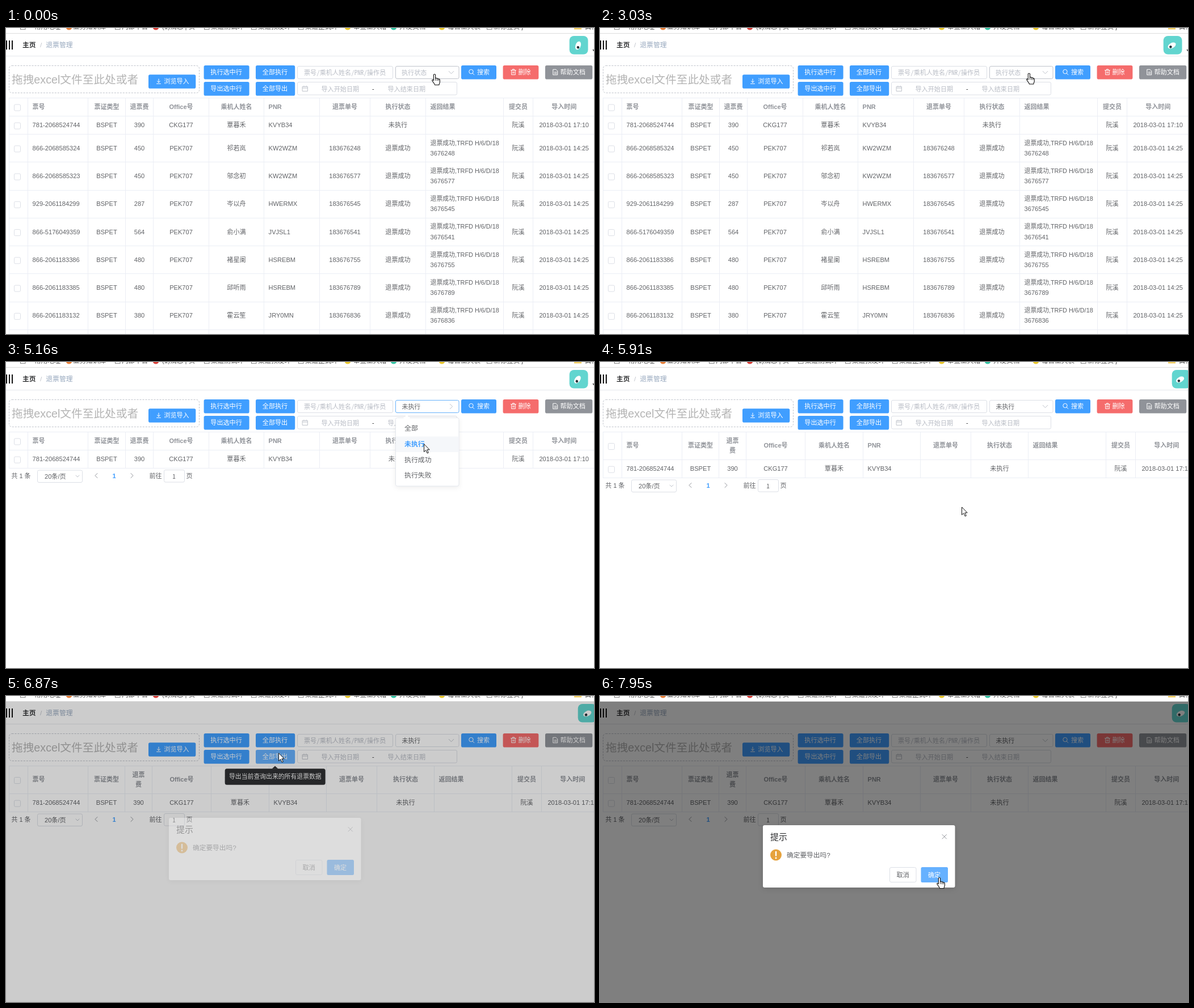
Write an HTML page that moves like this. It is 1036 px wide and 540 px high and loops after 8000 ms.

```html
<!DOCTYPE html>
<html lang="zh-CN">
<head>
<meta charset="utf-8">
<title>退票管理</title>
<style>
html, body { margin: 0; width: 100%; height: 100%; overflow: hidden; background: #fff; }
svg { display: block; font-family: "Liberation Sans", "Noto Sans CJK SC", "Noto Sans CJK JP", "Noto Sans CJK", sans-serif; }
text { white-space: pre; }
.thin { font-family: "Noto Sans Mono CJK SC", "Noto Sans CJK SC", "Noto Sans CJK", monospace; }
</style>
</head>
<body>
<svg id="stage" width="1036" height="540" viewBox="0 0 1036 540"></svg>
<script>
const LOOP = 8000;
const BLUE = '#409eff', LINE = '#ebeef5', EDGE = '#dcdfe6', BODY = '#606266', GREY = '#909399', PALE = '#c0c4cc';
const FOCUS = '#66b1fb';

// Drawing helpers; text is centred vertically on y
const text = (x, y, s, { size = 11.1, fill = BODY, mid = false, bold = false, cls = '' } = {}) =>
  `<text x="${x}" y="${(y + size * 0.36).toFixed(2)}" font-size="${size}" fill="${fill}" class="${cls}"` +
  `${mid ? ' text-anchor="middle"' : ''}${bold ? ' font-weight="700"' : ''}>${s}</text>`;
const rect = (x, y, w, h, fill, more = '') =>
  `<rect x="${x}" y="${y}" width="${w}" height="${h}" fill="${fill}" ${more}/>`;
const box = (x, y, w, h, more = '') => rect(x, y, w, h, '#fff', `rx="2.5" stroke="${EDGE}" ${more}`);
const line = (d, color, width = 1) =>
  `<path d="${d}" fill="none" stroke="${color}" stroke-width="${width}" stroke-linecap="round" stroke-linejoin="round"/>`;
const group = (id, inner) => `<g id="${id}">${inner}</g>`;
const button = (x, y, w, label, tx, fill = BLUE, id = '') =>
  rect(x, y, w, 24.5, fill, `rx="2.8" ${id && `id="${id}"`}`) + text(tx, y + 12.2, label, { fill: '#fff' });

// Browser strip: [kind, icon x, label x, label]
const marks = [
  ['page', 25, 50, '常用地址'], ['#e8803a', 111, 118, '业务知识库'], ['page', 192, 204, '内部平台'],
  ['#d9403a', 264, 275, '(1)消息 | 页'], ['page', 349, 361, '渠道测试环'], ['page', 432, 444, '渠道预发环'],
  ['page', 515, 527, '渠道正式环'], ['#e9c72b', 602, 612, '审查工具箱'], ['#35c5a5', 683, 693, '开发文档'],
  ['#e9c72b', 768, 778, '每日工具表'], ['page', 847, 859, '新标签页 j'], ['folder', 1001, 1020, '其他']
];
function strip() {
  const icon = (kind, x) =>
    kind === 'page' ? rect(x + 0.5, -8, 8.5, 10.5, '#fff', 'stroke="#888"') :
    kind === 'folder' ? rect(x, -6, 13, 8.5, '#f3cf63') :
    `<circle cx="${x}" cy="-2" r="5.5" fill="${kind}"/>`;
  return rect(0, 0, 1036, 10, '#fff') +
    marks.map(([k, x, tx, s]) => icon(k, x) + text(tx, -2.3, s, { size: 11.6, fill: '#555' })).join('') +
    rect(0, 9, 1036, 1, '#dcdcdc');
}

function header() {
  return [0, 5, 10].map(x => rect(x, 22, 2, 16, '#111')).join('') +
    text(29, 30, '主页', { size: 11.8, fill: '#303133', bold: true }) +
    text(60, 30, '/', { size: 11.8, fill: PALE }) +
    text(70.3, 30, '退票管理', { size: 11.8, fill: '#97a8be' }) +
    rect(0, 49, 1036, 1, '#e6e8ec') +
    group('avatar',
      rect(992.7, 14, 32.8, 32.6, '#62d5cf', 'rx="8"') +
      group('blob', '<ellipse rx="4.6" ry="7.6" fill="#fff"/><circle cx="1" cy="3" r="2.3" fill="#26323a"/>') +
      '<path d="M1033 38h7l-3.5 4z" fill="#555"/>');
}

function toolbar() {
  const hint = (x, y, s) => text(x, y, s, { fill: '#b8bcc5', cls: 'thin' });
  return rect(5.5, 66.5, 335, 48, '#fff', `rx="5" stroke="${PALE}" stroke-dasharray="3 2"`) +
    text(10, 91, '拖拽excel文件至此处或者', { size: 19.7, fill: '#b4b4b4' }) +
    button(251, 82.2, 83.3, '浏览导入', 278.3) +
    line('M269 90v6M266.5 93.7l2.5 2.5 2.5-2.5M265.5 98.3h7', '#fff') +
    button(348.6, 66.1, 80, '执行选中行', 360.3) + button(348.6, 95, 80, '导出选中行', 360.3) +
    button(440, 66.1, 69.2, '全部执行', 451.8) + button(440, 95, 69.2, '全部导出', 451.8, BLUE, 'exportAll') +
    box(513.5, 67.5, 168, 22) + hint(525, 79, '票号/乘机人姓名/PNR/操作员') +
    box(513.5, 95.5, 281, 22.5, 'id="dates"') +
    line('M522.5 103.5h9v8h-9zM522.5 106h9M525 102v2M529 102v2', PALE) +
    hint(555.5, 107.5, '导入开始日期') + text(645, 107, '-', { fill: '#303133' }) + hint(672.5, 107.5, '导入结束日期') +
    box(686.5, 67.5, 111.5, 22, 'id="select"') + group('choice', '') +
    group('caret', line('M-4.3 2.2L0-2.2 4.3 2.2', PALE)) +
    button(802, 66, 62, '搜索', 830) +
    '<circle cx="819.5" cy="77" r="3.7" fill="none" stroke="#fff"/>' + line('M822.3 80l2.5 2.5', '#fff') +
    button(875.6, 66, 62.8, '删除', 902.5, '#f56c6c') +
    line('M889.5 74.5h9M892.5 74.5v-1.7h3v1.7M890.7 74.8v7.7h6.6v-7.7M893 77v3M895 77v3', '#fff') +
    button(950, 66, 83.3, '帮助文档', 976.5, GREY) +
    line('M964.2 73.2h4.8l2.7 2.7v6.8h-7.5zM966 78h4M966 80.3h4', '#fff');
}

const wide = [5.5, 38.5, 144.5, 210.5, 259.5, 357.5, 454.5, 552.5, 641.5, 739.5, 876.5, 928.5, 1038];
const wider = [5.5, 38.5, 144.5, 209.5, 257.5, 361.5, 463.5, 564.5, 653.5, 754.5, 891.5, 943.5, 1053];
const titles = ['', '票号', '票证类型', '退票费', 'Office号', '乘机人姓名', 'PNR', '退票单号', '执行状态', '返回结果', '提交员', '导入时间'];
const tickets = [
  '781-2068524744 390 CKG177 覃暮禾 KVYB34',
  '866-2068585324 450 PEK707 祁若岚 KW2WZM 248',
  '866-2068585323 450 PEK707 邬念初 KW2WZM 577',
  '929-2061184299 287 PEK707 岑以舟 HWERMX 545',
  '866-5176049359 564 PEK707 俞小满 JVJSL1 541',
  '866-2061183386 480 PEK707 褚星阑 HSREBM 755',
  '866-2061183385 480 PEK707 邱听雨 HSREBM 789',
  '866-2061183132 380 PEK707 霍云笙 JRY0MN 836'
];
const leftCols = [1, 6, 9];

function table(cols, headH, count) {
  const cell = (i, y, s, opt = {}) => leftCols.includes(i)
    ? text(cols[i] + 8.1, y, s, opt)
    : text((cols[i] + cols[i + 1]) / 2, y, s, { ...opt, mid: true });
  const check = y => rect(14.5, y - 4.5, 11, 11, '#fff', `rx="2" stroke="${EDGE}"`);
  const wrap = headH > 40;
  const head = { size: 11, fill: GREY, bold: true };
  let y = 123.5, out = rect(5, 123, 1040, 1, LINE);
  const hy = y + headH / 2 - 0.5;
  out += check(hy + 0.5);
  titles.forEach((s, i) => {
    out += wrap && i === 3 ? cell(i, hy - 8.7, '退票', head) + cell(i, hy + 9, '费', head) : cell(i, hy, s, head);
  });
  y += headH;
  out += rect(5, y - 0.5, 1040, 1, LINE);
  tickets.slice(0, count).forEach((row, n) => {
    const [no, fee, office, name, pnr, tail] = row.split(' ');
    const h = n ? 49.25 : 32;
    const c = y + h / 2 - 0.3;
    out += check(c + 0.5);
    [no, 'BSPET', fee, office, name, pnr, tail ? '183676' + tail : '', tail ? '退票成功' : '未执行', '', '阮溪',
      '2018-03-01 ' + (tail ? '14:25' : '17:10')].forEach((s, i) => { out += cell(i + 1, c, s); });
    if (tail) out += cell(9, c - 9, '退票成功,TRFD H/6/D/18', { size: 10.85 }) + cell(9, c + 9, '3676' + tail);
    y += h;
    out += rect(5, Math.round(y - 0.5), 1040, 1, LINE);
  });
  const end = count > 1 ? 540 : y;
  return out + cols.map(x => rect(x - 0.5, 123, 1, end - 123, LINE)).join('');
}

function pager() {
  return text(9.5, 201, '共 1 条', { size: 10.9 }) +
    box(55.5, 191, 79, 21.5) + text(68, 201.5, '20条/页') + line('M123 200l3 3 3-3', PALE) +
    line('M161 196.5l-4 4 4 4', GREY) + text(190.5, 201, '1', { mid: true, fill: BLUE, bold: true }) +
    line('M220 196.5l4 4-4 4', GREY) + text(252.5, 201, '前往') +
    box(278.5, 190.5, 36, 21.5) + text(296, 201.5, '1', { mid: true, cls: 'thin' }) + text(317.5, 201, '页');
}

const options = [['全部', 117], ['未执行', 145], ['执行成功', 172.5], ['执行失败', 200]];
function menu() {
  return rect(686.5, 98.5, 111.5, 120.5, '#fff', 'rx="3" stroke="#e4e7ed" style="filter:drop-shadow(0 2px 4px #00000012)"') +
    '<path d="M700 99l6-5.5 6 5.5z" fill="#fff"/>' + rect(687, 131.5, 110.5, 27.5, '#f5f7fa', 'id="hover"') +
    options.map(([s, y]) => text(702, y, s, { size: 11.9, cls: 'option' })).join('');
}

function dialog() {
  return rect(287, 228, 338.5, 110, '#fff', 'rx="3" style="filter:drop-shadow(0 2px 5px #0002)"') +
    text(300, 249, '提示', { size: 14.9, fill: '#303133' }) +
    line('M603 244.5l7.5 7.5M610.5 244.5l-7.5 7.5', GREY) +
    '<circle cx="310" cy="280.5" r="10" fill="#e6a23c"/><circle cx="310" cy="286" r="1.4" fill="#fff"/>' +
    line('M310 275v6.5', '#fff', 2.4) +
    text(329, 280.5, '确定要导出吗?', { size: 11.7 }) +
    box(510.5, 302.5, 46.5, 26) + text(533.7, 316, '取消', { mid: true }) +
    rect(565.5, 302, 47.5, 27, BLUE, 'rx="2.5" id="ok"') + text(589, 316, '确定', { mid: true, fill: '#fff' });
}

const tip = rect(385.7, 128.2, 177, 28.6, '#303133', 'rx="3.5"') + '<path d="M468.5 128.5l5.5-5 5.5 5z" fill="#303133"/>' +
  text(393, 142.2, '导出当前查询出来的所有退票数据', { size: 10.85, fill: '#fff' });
const ink = 'fill="#fff" stroke="#111" stroke-linejoin="round"';

document.getElementById('stage').innerHTML =
  header() + toolbar() +
  group('all', table(wide, 32, 8)) + group('one', table(wide, 32, 1)) + group('oneWide', table(wider, 49, 1)) +
  rect(0, 120, 1036, 420, '#fff', 'id="veil"') +
  group('pager', pager()) + group('menu', menu()) + group('tip', tip) +
  rect(0, 10, 1036, 530, '#000', 'id="shade"') + group('dialog', dialog()) + strip() +
  group('hand', `<path ${ink} stroke-width="1.1" d="M-1.6 1.6Q-1.5 .5 0 .5T1.6 1.6V8C2 6.8 4.4 7 4.5 8.6 5 7.5 7 8 7.1 9.5 7.7 8.8 9.4 9.3 9.4 11V14C9.4 16.4 8 17 8 19.5H.5C.4 17-3.6 14-4.2 11.5-4.4 9.8-2.7 9.8-1.6 11.8Z"/>` +
    line('M1.6 8v3.5M4.5 8.8v3M7.1 9.7v2.3', '#111', 0.9)) +
  group('arrow', `<path ${ink} d="M.5 .8V14.6L3.7 11.6 6.2 17 8.3 16.1 5.9 10.8H10.2Z"/>`);

// Pointer: time, x, y of the tip
const path = [
  [0, 755, 81], [150, 755, 81], [1080, 757, 80], [1350, 738, 97], [1500, 735, 97], [1830, 744, 78],
  [2250, 744, 78], [3300, 760, 80], [3600, 764, 82], [3870, 769, 96], [4020, 769, 96], [4600, 738, 143],
  [5160, 736, 144], [5400, 736, 144], [5900, 640, 258], [6450, 490, 118], [6600, 481, 99], [6840, 481, 99],
  [6870, 480, 100], [7020, 480, 100], [7580, 598, 326], [7710, 597, 326], [7940, 598, 320], [8000, 598, 320]
];
// Stepped values: time, value
const steps = {
  hand: [[0, 1], [3780, 0], [4080, 1], [5070, 0], [6480, 1], [6870, 0], [7500, 1]],
  menu: [[0, 0], [3600, 0.5], [3720, 1], [5310, 0.4], [5430, 0]],
  turn: [[0, 180], [3600, 90], [3720, 0], [5160, 90], [5310, 180]],
  edge: [[0, PALE], [3600, FOCUS], [5430, EDGE]],
  dates: [[0, EDGE], [1300, PALE], [1600, EDGE]],
  veil: [[0, 0], [3180, 0.7], [3300, 0]],
  view: [[0, 'all'], [5040, 'one'], [5700, 'oneWide']],
  tip: [[0, 0], [6600, 0.6], [6720, 1], [7020, 0.5], [7140, 0]],
  shade: [[0, 0], [6870, 0.2], [7020, 0.5]],
  dialog: [[0, 0], [6870, 0.35], [7020, 0.9], [7140, 1]],
  drop: [[0, -20], [6870, -13], [7020, -2], [7140, 0]],
  exportAll: [[0, BLUE], [6480, '#66b1ff'], [6600, '#3a8ee6'], [6870, '#66b1ff'], [7140, BLUE]],
  ok: [[0, BLUE], [7500, '#66b1ff']]
};
const at = (name, t) => steps[name].findLast(s => s[0] <= t)[1];
function pointer(t) {
  const i = path.findIndex(p => p[0] > t);
  const [a, b] = [path[i - 1], path[i]];
  const k = (t - a[0]) / (b[0] - a[0]);
  return [a[1] + (b[1] - a[1]) * k, a[2] + (b[2] - a[2]) * k];
}

const el = id => document.getElementById(id);
const set = (id, name, value) => el(id).setAttribute(name, value);
const show = (id, on) => set(id, 'display', on ? 'inline' : 'none');
const optionTexts = document.querySelectorAll('.option');
const choices = {
  empty: text(697, 79, '执行状态', { fill: '#b8bcc5', cls: 'thin' }),
  picked: text(697.5, 79, '未执行', { size: 10.9 })
};
let shown = '';

function draw(t) {
  const view = at('view', t), picked = view !== 'all';
  const [x, y] = pointer(t);
  for (const id of ['all', 'one', 'oneWide']) show(id, id === view);
  for (const id of ['menu', 'tip', 'shade', 'dialog', 'veil']) set(id, 'opacity', at(id, t));
  for (const id of ['exportAll', 'ok']) set(id, 'fill', at(id, t));
  set('select', 'stroke', at('edge', t));
  set('dates', 'stroke', at('dates', t));
  set('caret', 'transform', `translate(784.5 78.5) rotate(${at('turn', t)})`);
  set('dialog', 'transform', `translate(0 ${at('drop', t)})`);

  const want = picked ? 'picked' : 'empty';
  if (shown !== want) el('choice').innerHTML = choices[shown = want];
  show('pager', picked);
  set('pager', 'transform', `translate(0 ${view === 'oneWide' ? 17 : 0})`);

  show('hover', y > 103);
  set('hover', 'y', y < 131 ? 104 : 131.5);
  optionTexts.forEach((option, i) => {
    const on = picked && i === 1;
    option.setAttribute('fill', on ? BLUE : BODY);
    option.setAttribute('font-weight', on ? 700 : 400);
  });

  const beat = Math.floor(t / 135);
  set('avatar', 'transform', `translate(${view === 'oneWide' ? 15 : 0} 0)`);
  set('blob', 'transform', `translate(${1008 + Math.sin(beat * 1.3) * 1.5} 31) rotate(${20 + Math.sin(beat * 0.9) * 50})`);

  const hand = at('hand', t);
  show('hand', hand);
  show('arrow', !hand);
  set(hand ? 'hand' : 'arrow', 'transform', `translate(${x.toFixed(1)} ${y.toFixed(1)})`);
}

const start = performance.now();
function tick() {
  draw((performance.now() - start) % LOOP);
  requestAnimationFrame(tick);
}
tick();
</script>
</body>
</html>
```
